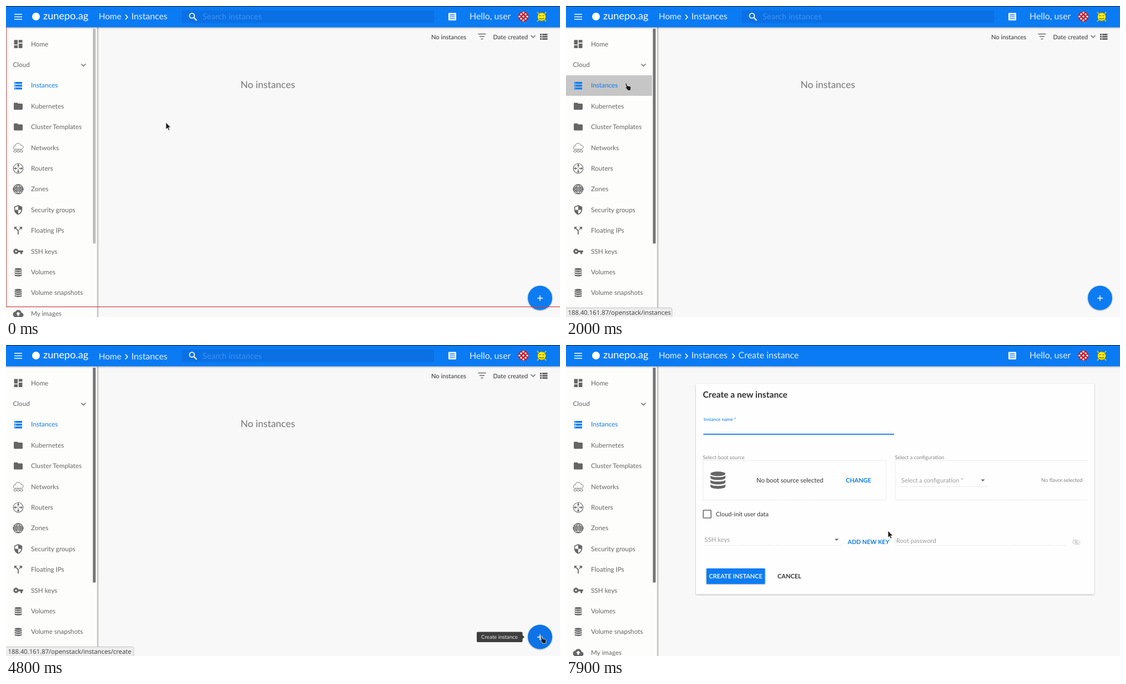
Write an HTML page that moves like this. It is 998x561 px and loops after 8 s.

```html
<!DOCTYPE html>
<html lang="en">
<head>
<meta charset="utf-8">
<title>Cloud console</title>
<style>
html, body { margin: 0; width: 100%; height: 100%; overflow: hidden; background: #f8f8f8; }
svg { display: block; width: 998px; height: 561px; font-family: Lato, sans-serif; text-rendering: geometricPrecision; }
</style>
</head>
<body>
<svg id="stage" viewBox="0 0 998 561" xmlns="http://www.w3.org/2000/svg">
  <defs>
    <filter id="soft" x="-20%" y="-20%" width="140%" height="150%">
      <feDropShadow dx="0" dy="1" stdDeviation="1.3" flood-color="#000" flood-opacity=".35"/>
    </filter>
    <linearGradient id="edge">
      <stop offset="0" stop-color="#000" stop-opacity=".28"/>
      <stop offset="1" stop-color="#000" stop-opacity="0"/>
    </linearGradient>
    <linearGradient id="under" x2="0" y2="1">
      <stop offset="0" stop-color="#000" stop-opacity=".25"/>
      <stop offset="1" stop-color="#000" stop-opacity="0"/>
    </linearGradient>
  </defs>
  <rect width="998" height="561" fill="#f8f8f8"/>
  <g id="list"></g>
  <g id="form"></g>
  <g id="side"></g>
  <g id="head"></g>
  <g id="frame" fill="#c8403f">
    <rect id="frameLeft" y="38" width="1" height="505"/>
    <rect id="frameBottom" y="542" width="998" height="1.2"/>
  </g>
  <g id="status">
    <path id="statusBox" fill="#ededed" stroke="#c4c4c4"/>
    <text id="statusText" x="3.5" y="557" font-size="11.3" fill="#3c3c3c" font-family="Open Sans, sans-serif"></text>
  </g>
  <g id="pointer">
    <path id="arrow" d="M0 0V12.6L2.8 10 4.9 14.4 6.9 13.5 4.9 9.1H8.8Z" fill="#1c1c1c" stroke="#fff" stroke-width=".8"/>
    <path id="hand" d="M.6 1.6Q1.6 .2 2.8 1.6L4.8 6 9.4 6.8Q11.2 7.4 11 9.4L10.4 12V14.4H4.6V12.8L.8 9.4Q.6 7.8 2.8 8.4Z" fill="#1c1c1c" stroke="#fff" stroke-width=".7"/>
  </g>
</svg>
<script>
const $ = id => document.getElementById(id);
const BLUE = '#0b7bf3', GREY = '#666', INK = '#333';

const text = (x, y, s, size, fill = GREY, weight = 400) =>
  `<text x="${x}" y="${y}" font-size="${size}" fill="${fill}" font-weight="${weight}">${s}</text>`;
const rect = (x, y, w, h, fill, more = '') =>
  `<rect x="${x}" y="${y}" width="${w}" height="${h}" fill="${fill}" ${more}/>`;
const line = (d, color, width = 1, more = '') =>
  `<path d="${d}" fill="none" stroke="${color}" stroke-width="${width}" ${more}/>`;
// Places a 24-unit icon with its centre at x, y.
const icon = (x, y, scale, body, fill = GREY) =>
  `<g transform="translate(${x} ${y}) scale(${scale}) translate(-12 -12)" fill="${fill}">${body}</g>`;
const shape = d => `<path fill-rule="evenodd" d="${d}"/>`;

const slab = y => `M3 ${y}v3c0 3.6 18 3.6 18 0v-3c0 3 -18 3 -18 0z`;
const glyphs = {
  home: shape('M3 13h8V3H3zM3 21h8v-6H3zM13 21h8V11h-8zM13 3v6h8V3z'),
  server: shape([3, 10, 17].map(y => `M2 ${y}h20v5H2zM4 ${y + 1.5}h2v2H4z`).join('')),
  folder: shape('M10 4H4q-2 0-2 2v12q0 2 2 2h16q2 0 2-2V8q0-2-2-2h-8z'),
  network: line('M5 15.5C-1 15 0 8 5 8.5 5 1 16 0 18 6.5 25 6 25 15 19 15.5ZM1 20H23', GREY, 1.1) +
    [5, 12, 19].map(x => `<circle cx="${x}" cy="20" r="2.6" fill="#fdfdfc" stroke="${GREY}"/>`).join(''),
  router: `<circle cx="12" cy="12" r="11" fill="none" stroke="${GREY}" stroke-width="1.3"/>` +
    [0, 90, 180, 270].map(a => `<path transform="rotate(${a} 12 12)" d="M11.2 10V6H9l3-4 3 4h-2.2v4z"/>`).join(''),
  globe: line('M12 1.5a10.5 10.5 0 1 0 .01 0M12 1.5C5 8 5 16 12 22.5 19 16 19 8 12 1.5M3 7.5H21M3 16.5H21', GREY, 1.7) +
    rect(0, 9.5, 24, 5, GREY) + line('M3 12h18', '#fdfdfc', 1.2, 'stroke-dasharray="2 1"'),
  shield: shape('M12 1L3 5v6c0 5.5 3.8 10.7 9 12 5.2-1.3 9-6.5 9-12V5zM12 12h7c-.5 4.1-3.3 7.8-7 8.9V12H5V6.3l7-3.1z'),
  split: shape('M14 4l2.3 2.3-2.9 2.9 1.4 1.4 2.9-2.9L20 10V4zM10 4H4v6l2.3-2.3 4.7 4.7V20h2v-8.4L7.7 6.3z'),
  key: shape('M12.7 10C11.8 7.7 9.6 6 7 6a6 6 0 0 0 0 12c2.6 0 4.8-1.7 5.7-4H17v4h4v-4h2v-4zM7 14a2 2 0 1 1 .01 0z'),
  disks: '<ellipse cx="12" cy="4.6" rx="9" ry="2.7"/>' + shape(slab(6.3) + slab(11.6) + slab(16.9)),
  upload: shape('M19.4 10C18 2 8 2 5.4 8 -2 9-1.500 20 6 20h13c6.500 0 6.500-9.500.4-10zM14 13v4h-4v-4H7l5-5 5 5z')
};
const chevron = (x, y, color) => line(`M${x - 4} ${y - 2}l4 4 4-4`, color, 1.5);
const caretDown = (x, y) => `<path d="M${x - 3.5} ${y - 1.5}h7l-3.500 3.500z" fill="${GREY}"/>`;

const menu = [
  ['Home', 'home', .83], ['Cloud'], ['Instances', 'server', .7], ['Kubernetes', 'folder', .8],
  ['Cluster Templates', 'folder', .8], ['Networks', 'network', .8], ['Routers', 'router', .8],
  ['Zones', 'globe', .8], ['Security groups', 'shield', .8], ['Floating IPs', 'split', .88],
  ['SSH keys', 'key', .8], ['Volumes', 'disks', .72], ['Volume snapshots', 'disks', .72],
  ['My images', 'upload', .8]
];

function buildSide() {
  let out = rect(0, 38, 164, 523, '#fdfdfc') + rect(164, 38, 4, 523, 'url(#edge)') +
    rect(0, 125, 155, 37, '#c6c6c6', 'id="hover"') +
    rect(156.5, 41, 5, 387.5, '#bcbcbc', 'id="bar" rx="1"');
  menu.forEach(([label, glyph, scale], i) => {
    const y = 68.6 + i * 37.4, color = i === 2 ? BLUE : GREY;
    if (glyph) out += icon(22, y, scale, glyphs[glyph], color);
    out += text(glyph ? 45 : 12.5, y + 4, label, 11.75, color);
  });
  $('side').innerHTML = out + chevron(139.5, 106.5, GREY);
}

function buildHead() {
  const pale = '#e3f0ff', sep = x => line(`M${x} 15.500l4 4.500-4 4.500`, '#fff', 1.6);
  const spots = [[-4, -4], [4, -4], [0, 0], [-4, 4], [4, 4], [0, -7], [0, 7], [-7, 0], [7, 0]]
    .map(([x, y]) => rect(930.5 + x, 17.5 + y, 3, 3, '#fff', `transform="rotate(45 ${932 + x} ${19 + y})"`)).join('');
  $('head').innerHTML = rect(0, 38, 998, 4, 'url(#under)') + rect(0, 0, 998, 38.5, BLUE) + rect(0, 0, 998, 1, '#17202c') +
    line('M15 15h14M15 19.500h14M15 24h14', '#fff', 1.7) +
    '<circle cx="54" cy="19" r="7" fill="#fff"/>' + text(67, 24.3, 'zunepo.ag', 18.2, '#fff') +
    `<g id="crumbs">${text(167, 24.3, 'Home', 15.3, pale)}${sep(215)}${text(226, 24.3, 'Instances', 15.8, pale)}
      <g id="crumb3">${sep(299.5)}${text(310.5, 24.3, 'Create instance', 16, pale)}</g></g>` +
    `<g id="search">${rect(317, 8, 454, 22.5, '#0a70e4', 'rx="2"')}
      <circle cx="335" cy="17.500" r="4.400" fill="none" stroke="#fff" stroke-width="1.800"/>
      ${line('M338.500 21l5 5', '#fff', 2.2)}
      <g id="hint">${text(354, 23.7, 'Search instances', 14.7, '#3c92f2')}</g></g>` +
    rect(797, 12.5, 14, 13.5, '#fff', 'rx="1"') + line('M799.500 16h9M799.500 19.200h9M799.500 22.400h9', BLUE, 1.3) +
    `<g id="hello">${text(835, 23.8, 'Hello, user', 15.9, pale)}</g>` +
    `<circle cx="932" cy="19" r="9.300" fill="#c01f2c"/>${spots}` +
    line('M957 11l16 17M973 11l-16 17', '#e9e000', 1.6) +
    `<circle cx="965" cy="19.500" r="7.500" fill="#f3ea12" stroke="#837b15" stroke-width=".8"/>` +
    line('M960.500 17.500h3M966.500 17.500h3M961 22q4 3 8 0', '#5f5a10', 1.2);
}

function buildList() {
  const rows = [51, 55, 59].map(y => rect(962, y - 1, 3, 3, GREY) + rect(966, y - 1, 9.5, 3, GREY)).join('');
  $('list').innerHTML = text(766, 59.5, 'No instances', 11.2, INK) +
    line('M850.500 50.500h14M853 55h9M855.500 59.500h4', GREY, 1.5) +
    text(877.5, 59.5, 'Date created', 11.1, INK) + chevron(949.5, 55, GREY) + rows +
    text(422.5, 147.5, 'No instances', 17.4, '#757575') +
    `<circle id="fab" cx="962" cy="526.500" r="22" fill="${BLUE}" filter="url(#soft)"/>` +
    line('M957 527h10M962 522v10', '#fff', 1.5) +
    `<g id="tip">${rect(848, 517.5, 82.5, 18.5, '#3e3e3e', 'rx="2"')}
      <path d="M930 523l4 3.700-4 3.700z" fill="#3e3e3e"/>${text(856, 530, 'Create instance', 9.7, '#e8e8e8')}</g>`;
}

function buildForm() {
  const pale = '#9a9a9a', dots = 'stroke-dasharray="1 1.500"';
  const rule = d => line(d, '#cfcfcf', 1, dots);
  const eye = line('M912 355.500q7-8 14 0q-7 8-14 0M913 350l12 11', '#d2d2d2', 1.2) +
    '<circle cx="919" cy="355.500" r="2.500" fill="#d2d2d2"/>';
  $('form').innerHTML = rect(234, 70, 717.5, 379.5, '#fefefe', 'filter="url(#soft)"') +
    text(246.5, 94.5, 'Create a new instance', 15.6, INK, 700) +
    text(248, 137, 'Instance name *', 8.3, BLUE) + rect(247.5, 160, 343.5, 1.8, BLUE) +
    rect(249.3, 144, 1, 13, '#333', 'id="caret"') +
    text(246.5, 206, 'Select boot source', 9.25, '#858585') + text(592.5, 206, 'Select a configuration', 9.35, '#858585') +
    rule('M247 208.500H577V279.500H247Z') + rule('M940 208.500H593V279.500H940') +
    icon(273.7, 243.5, 1.5, glyphs.disks) +
    text(343, 248, 'No boot source selected', 11.3, INK) + text(504, 248, 'CHANGE', 10.9, BLUE, 700) +
    text(604, 248, 'Select a configuration *', 11, pale) + caretDown(751, 244) + rule('M603 255.500H760') +
    text(856, 247.3, 'No flavor selected', 9.35, '#858585') +
    rect(247.3, 298, 14, 14, 'none', `stroke="${GREY}" stroke-width="1.600" rx="1"`) +
    text(270, 309, 'Cloud-init user data', 11, INK) +
    text(249.5, 354.8, 'SSH keys', 11.3, pale) + caretDown(487.5, 351) + rule('M249 361.500H496') +
    text(507.5, 358.5, 'ADD NEW KEY', 10.7, BLUE, 700) +
    text(595, 357, 'Root password', 11, pale) + rule('M594 361.500H900') + eye +
    rect(253, 403, 105.5, 28, BLUE, 'rx="1" filter="url(#soft)"') +
    text(257.5, 421, 'CREATE INSTANCE', 11, '#eaf4ff', 700) + text(381, 421, 'CANCEL', 11, INK, 700);
}

buildSide(); buildHead(); buildList(); buildForm();

const URL_BASE = '188.40.161.87/openstack/instances';
// Pointer legs: start, end, then the place reached.
const legs = [[1050, 1450, 106, 138], [2900, 3500, 962, 524], [5600, 6100, 787, 431], [6500, 7250, 580, 335]];
const ease = p => p * p * (3 - 2 * p);
const ramp = (t, a, b) => Math.min(1, Math.max(0, (t - a) / (b - a)));
const show = (id, on) => $(id).setAttribute('visibility', on ? 'inherit' : 'hidden');
const shift = (id, y) => $(id).setAttribute('transform', `translate(0 ${y})`);

function pointerAt(t) {
  let x = 288, y = 210;
  for (const [a, b, tx, ty] of legs) {
    const p = ease(ramp(t, a, b));
    x += (tx - x) * p;
    y += (ty - y) * p;
  }
  return [x, y];
}

function draw(t) {
  const onForm = t >= 4900, [x, y] = pointerAt(t);
  show('list', !onForm);
  show('form', onForm);
  show('crumb3', onForm);
  show('search', !onForm);
  show('caret', onForm && Math.floor((t - 4900) / 600) % 2 === 0);

  const overItem = t > 1050 && t < 3300 && x < 155;
  const overFab = !onForm && Math.hypot(x - 962, y - 526) < 22;
  show('hand', overItem || overFab);
  show('arrow', !(overItem || overFab));
  $('pointer').setAttribute('transform', `translate(${x} ${y})`);
  show('hover', t >= 1330 && t < 4400);
  show('tip', t >= 3600);
  $('fab').setAttribute('fill', t >= 4700 ? '#0a73e6' : BLUE);
  $('bar').setAttribute('fill', t >= 1400 ? '#747474' : '#bcbcbc');

  show('frame', t < 1400);
  show('frameBottom', t < 500);
  $('frameLeft').setAttribute('height', t < 500 ? 505 : 480);

  const create = t >= 2500, width = create ? 230 : 191;
  show('status', (t >= 500 && t < 2500) || (t >= 3800 && t < 5000));
  $('status').setAttribute('opacity', create ? ramp(t, 3700, 4200) : 1);
  $('statusBox').setAttribute('d', `M-1 544.500H${width - 3}q3 0 3 3V562H-1Z`);
  $('statusText').textContent = URL_BASE + (create ? '/create' : '');

  const pressed = t >= 4700 && !onForm;
  shift('crumbs', pressed ? 1.3 : 0);
  shift('hint', pressed ? 1.3 : 0);
  shift('hello', pressed ? 1 : 0);
}

const begin = performance.now();
function tick() {
  draw((performance.now() - begin) % 8000);
  requestAnimationFrame(tick);
}
draw(0);
requestAnimationFrame(tick);
</script>
</body>
</html>
```
